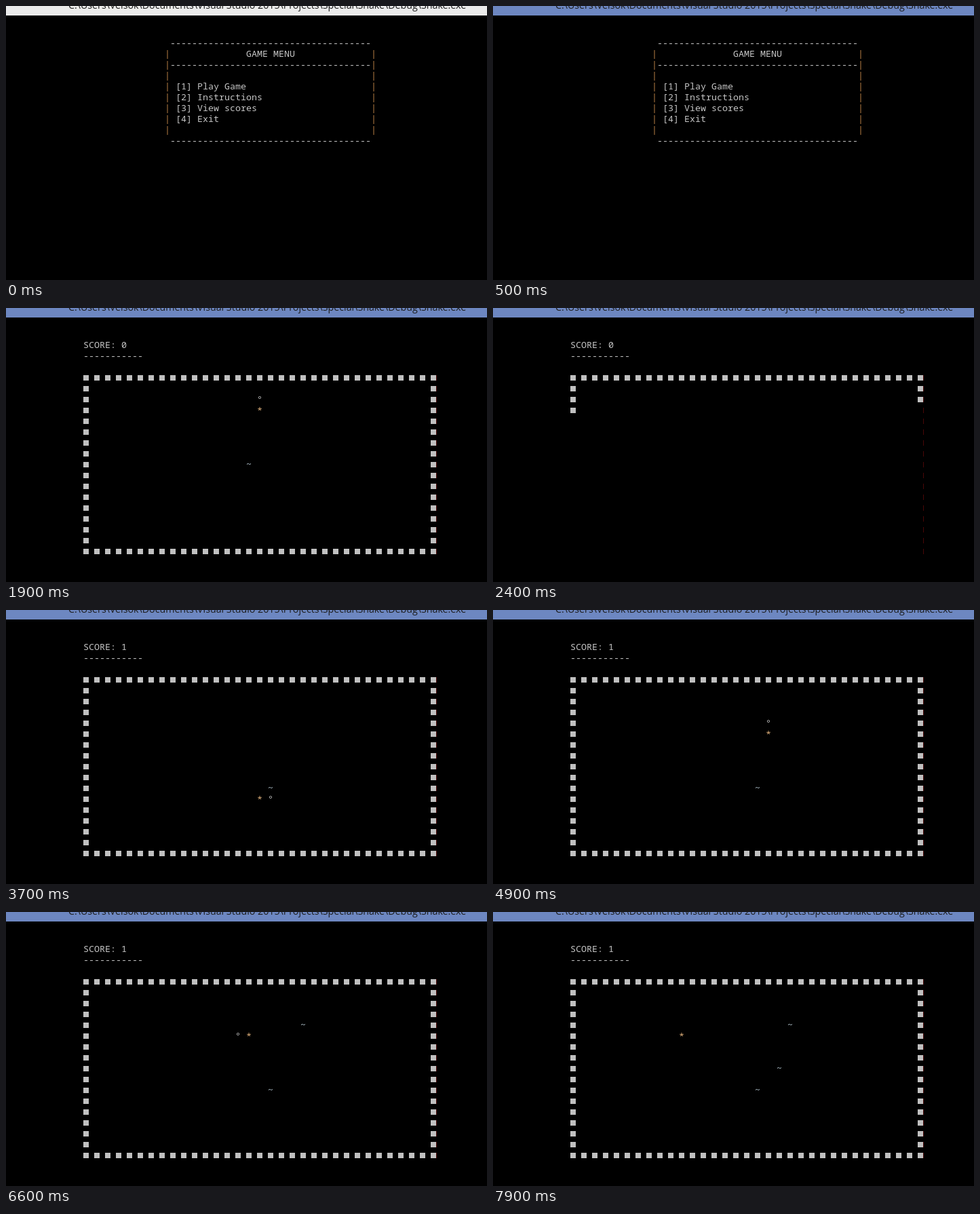
These frames come from a looping animation (709x404 px, 8 s). An HTML page:

```html
<!DOCTYPE html>
<html lang="en">
<head>
<meta charset="utf-8">
<title>Snake console</title>
<style>
  html, body { margin: 0; width: 100%; height: 100%; overflow: hidden; background: #000; }
  svg { display: block; width: 709px; height: 404px; }
  text { font: 13.333px "Noto Sans Mono", "DejaVu Sans Mono", monospace; fill: #c4c4c4; white-space: pre; }
  .title { font: 14.22px "Open Sans", "Noto Sans", sans-serif; fill: #1c1c1c; }
  .pipe { fill: #bd8347; }
  .body { fill: #e2b27c; }
  .food { fill: #b9cbd6; }
  .block { fill: #c0c0c0; }
  .fringe { fill: #4a0808; }
</style>
</head>
<body>
<svg id="stage" viewBox="0 0 709 404">
  <rect id="bar" width="709" height="14" fill="#ebebeb"/>
  <text class="title" x="92" y="4">C:\Users\Velsok\Documents\Visual Studio 2015\Projects\Special\Snake\Debug\Snake.exe</text>
  <g id="menu"></g>
  <g id="game"></g>
</svg>
<script>
const LOOP = 8000, TICK = 100, CELL = 16, COLS = 33, ROWS = 17;
const NS = "http://www.w3.org/2000/svg";
const $ = id => document.getElementById(id);
const menu = $("menu"), game = $("game");

function add(parent, tag, attrs, content = "") {
  const el = document.createElementNS(NS, tag);
  for (const key in attrs) el.setAttribute(key, attrs[key]);
  el.textContent = content;
  parent.appendChild(el);
  return el;
}
const write = (parent, x, y, content, cls = "") =>
  add(parent, "text", { x, y, class: cls }, content);
const show = (el, on) => el.setAttribute("visibility", on ? "visible" : "hidden");

// Menu
for (const y of [59, 91, 203]) write(menu, 242, y, "-".repeat(37));
write(menu, 354, 75, "GAME MENU");
["Play Game", "Instructions", "View scores", "Exit"].forEach((label, i) =>
  write(menu, 250, 123 + i * CELL, `[${i + 1}] ${label}`));
for (let i = 0; i < 8; i++)
  for (const x of [234, 538]) write(menu, x, 75 + i * CELL, "|", "pipe");

// Board
const score = write(game, 114, 59, "SCORE: 0");
write(game, 114, 75, "-".repeat(11));
const blocks = [];
for (let row = 0; row < ROWS; row++) {
  const edge = row === 0 || row === ROWS - 1;
  for (let col = 0; col < COLS; col += edge ? 1 : COLS - 1) {
    const x = 114 + col * CELL, y = 99 + row * CELL;
    if (col === COLS - 1)
      add(game, "rect", { x: x + 8, y, width: 1, height: 8, class: "fringe" });
    const el = add(game, "rect", { x, y, width: 8, height: 8, class: "block" });
    blocks.push({ el, order: row + col / COLS });
  }
}

// Food: column, row, first and last moment
const foods = [
  [15, 8, 1000, 3200],
  [17, 10, 3200, LOOP],
  [20, 4, 5200, LOOP],
  [19, 8, 6900, LOOP]
].map(([col, row, from, to]) => ({
  el: write(game, 114 + col * CELL, 107 + row * CELL, "~", "food"), from, to
}));

// Turns of the head: time, column, row
const path = [
  [900, 16, 9], [1100, 16, 7], [1900, 16, 2], [2200, 19, 2], [2800, 19, 8],
  [3200, 15, 8], [3500, 15, 11], [3800, 18, 11], [4500, 18, 6], [4900, 18, 4],
  [5100, 17, 4], [5250, 17, 5], [5400, 16, 5], [6300, 14, 5], [6600, 14, 5],
  [7200, 10, 5], [LOOP, 10, 5]
];
// Every cell the head enters, with its time
const trail = [];
path.forEach(([t1, c1, r1], i) => {
  if (!i) return trail.push({ t: t1, col: c1, row: r1 });
  const [t0, c0, r0] = path[i - 1];
  const n = Math.abs(c1 - c0) + Math.abs(r1 - r0);
  for (let k = 1; k <= n; k++)
    trail.push({
      t: Math.round(t0 + (t1 - t0) * k / n),
      col: c0 + (c1 - c0) * k / n,
      row: r0 + (r1 - r0) * k / n
    });
});

const head = write(game, 0, 0, "°");
const body = write(game, 0, 0, "*", "body");
function place(el, cell, dy) {
  el.setAttribute("x", 114 + cell.col * CELL);
  el.setAttribute("y", 107 + cell.row * CELL + dy);
}

// How many board rows are printed while the screen is refreshed
function printedRows(t) {
  if (t < 2300 || t >= 2700) return ROWS;
  return t < 2400 ? 2 : 3.5 + (t - 2400) * 0.045;
}

function draw(t) {
  const playing = t >= 1000;
  $("bar").setAttribute("fill", t < 500 ? "#ebebeb" : "#6d87c1");
  menu.style.display = playing ? "none" : "";
  game.style.display = playing ? "" : "none";
  if (!playing) return;

  score.textContent = "SCORE: " + (t < 3200 ? 0 : 1);
  const rows = printedRows(t), full = rows === ROWS;
  for (const b of blocks) show(b.el, b.order < rows);
  for (const f of foods) show(f.el, full && t >= f.from && t < f.to);

  let i = trail.length - 1;
  while (i > 1 && trail[i].t > t) i--;
  const stepping = t >= 7900;
  place(head, trail[i], 0);
  place(body, trail[stepping ? i : i - 1], 1);
  show(head, full && !stepping);
  show(body, full && (t < 7800 || stepping));
}

const start = performance.now();
function frame() {
  const t = (performance.now() - start) % LOOP;
  draw(Math.floor(t / TICK) * TICK);
  requestAnimationFrame(frame);
}
frame();
</script>
</body>
</html>
```
